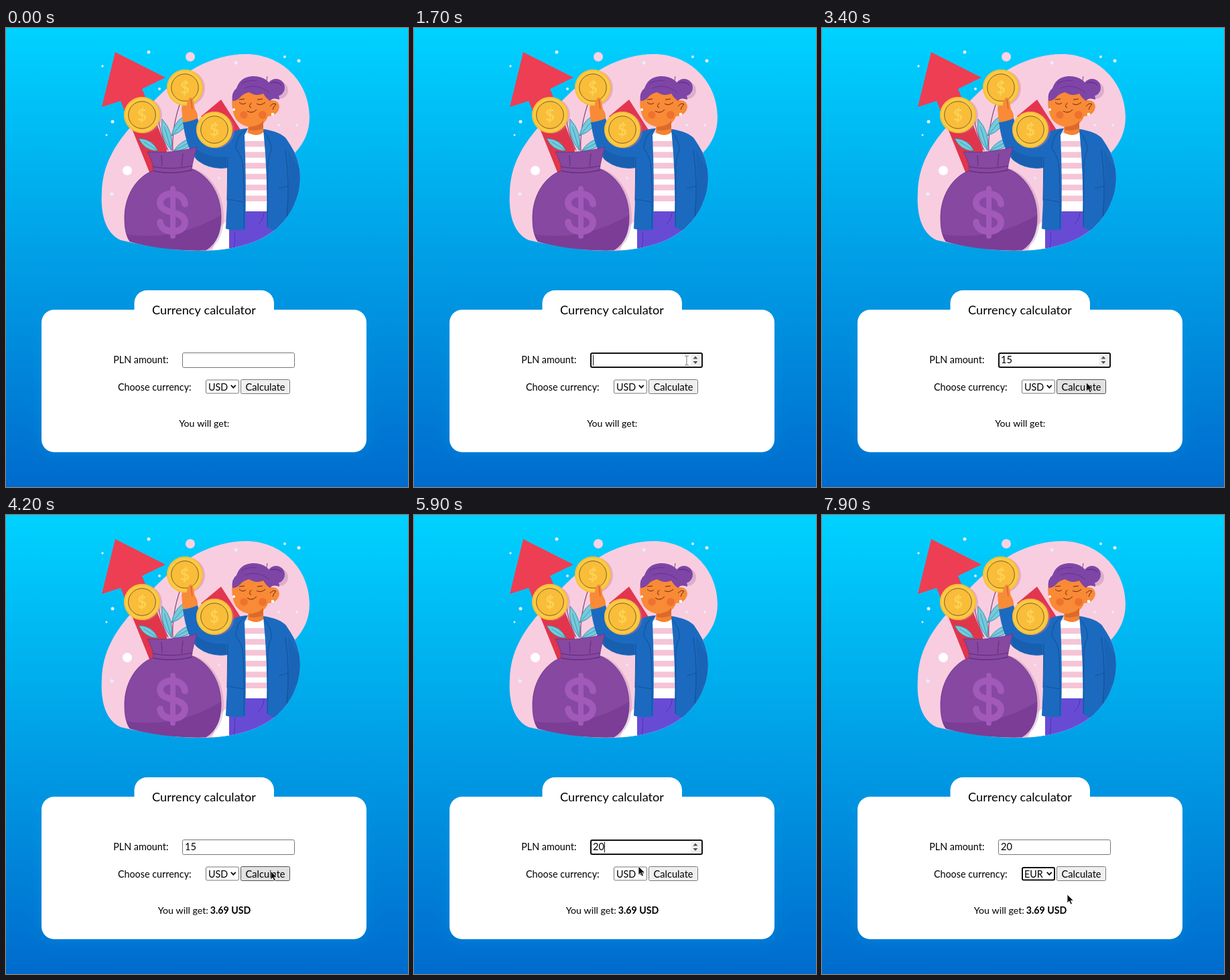
Animation, 600 px wide and 686 px high, one loop 8000 ms. Source, as an HTML page with a canvas:

```html
<!DOCTYPE html>
<html lang="en">
<head>
<meta charset="utf-8">
<title>Currency calculator</title>
<style>
html, body { margin: 0; width: 100%; height: 100%; overflow: hidden; }
canvas { display: block; width: 600px; height: 686px; }
</style>
</head>
<body>
<canvas id="stage"></canvas>
<script>
const W = 600, H = 686, LOOP = 8000, STEP = 100;
const canvas = document.getElementById('stage');
const dpr = window.devicePixelRatio || 1;
canvas.width = W * dpr;
canvas.height = H * dpr;
const c = canvas.getContext('2d');

function shape(d, fill, stroke, width = 1) {
  const p = new Path2D(d);
  if (fill) { c.fillStyle = fill; c.fill(p); }
  if (stroke) { c.strokeStyle = stroke; c.lineWidth = width; c.stroke(p); }
}

function dot(x, y, r, fill, stroke, width = 1) {
  c.beginPath();
  c.arc(x, y, r, 0, Math.PI * 2);
  if (fill) { c.fillStyle = fill; c.fill(); }
  if (stroke) { c.strokeStyle = stroke; c.lineWidth = width; c.stroke(); }
}

function box(x, y, w, h, r, fill, stroke, width = 1) {
  c.beginPath();
  c.roundRect(x, y, w, h, r);
  if (fill) { c.fillStyle = fill; c.fill(); }
  if (stroke) { c.strokeStyle = stroke; c.lineWidth = width; c.stroke(); }
}

function label(s, x, y, size = 14.35, weight = 400, align = 'left', color = '#000') {
  c.font = `${weight} ${size}px Lato, sans-serif`;
  c.textAlign = align;
  c.fillStyle = color;
  c.fillText(s, x, y);
}

// ---- illustration ----
const BLOB = 'M143 245C144 205 162 174 192 141C222 105 250 78 285 58C308 46 334 39 358 39' +
  'C411 39 453 80 453 133C453 155 445 172 431 187C441 207 441 237 433 256' +
  'C425 280 409 299 386 312C355 329 315 334 280 333C245 332 205 325 171 317C147 306 141 275 143 245Z';
const BAG = 'M220 213C195 222 176 251 177 286C177 303 181 314 185 319C220 329 262 333 298 332' +
  'C315 322 321 304 321 283C321 249 304 222 279 211Z';
const NECK = 'M211 185Q247 188 285 178C281 190 278 202 277 213Q248 219 220 214C220 204 216 194 211 185Z';
const DOTS = [[213, 36, 2.5], [343, 52, 2.5], [416, 43, 2], [437, 49, 2.5], [159, 140, 2.5], [150, 160, 1.5],
  [144, 57, 1.7], [158, 248, 2.5], [229, 91, 2], [318, 224, 1.8], [407, 145, 1.8], [434, 145, 1.8]];
const SKIN = '#f98a36', HAIR = '#7f45a6', JACKET = '#1b6abf', SEAM = '#154b90';

function coin(x, y) {
  dot(x + 3, y + 1, 27, 'rgba(196,120,160,.4)');
  dot(x, y, 27, '#fdca42');
  dot(x, y, 26, null, '#f6bc3a', 1.5);
  dot(x, y, 20.3, '#f9bd39', '#7b5c32', 1);
  label('$', x, y + 8.5, 24, 700, 'center', '#fdd255');
}

function leaf(x, y, tx, ty, bend) {
  const mx = (x + tx) / 2, my = (y + ty) / 2;
  const nx = (ty - y) * bend, ny = (x - tx) * bend;
  shape(`M${x} ${y}Q${mx + nx} ${my + ny} ${tx} ${ty}Q${mx - nx} ${my - ny} ${x} ${y}Z`, '#74cbdc', '#2f819e', 0.8);
  shape(`M${x} ${y}L${(mx + tx) / 2} ${(my + ty) / 2}`, null, '#2f819e', 0.7);
}

function woman() {
  // raised arm
  shape('M264 141L262 120Q263 111 269 110L273 105Q276 102 279 106L281 120Q287 126 286 138Z', SKIN);
  shape('M264 141Q275 140 286 135L292 157L333 164L331 209Q306 213 287 199Q270 185 264 141Z', JACKET);
  shape('M283 180Q302 195 329 192L329 208Q302 211 284 196Z', '#185fb0');

  c.save();
  c.clip(new Path2D(BLOB));
  shape('M308 332L318 300Q328 287 334 288L334 334Z', '#fff');
  shape('M333 272H404L409 315Q370 334 333 330Z', '#684bd5');
  shape('M341 304Q343 318 340 330M385 276Q384 287 376 294', null, '#4630a8', 0.8);
  shape('M355 156Q372 162 388 154L391 274H355Z', '#fff');
  for (let i = 0; i < 6; i++) {
    c.fillStyle = '#f5c4d7';
    c.fillRect(356, 169 + i * 16.3, 34, 8.5);
  }
  shape('M384 151Q409 155 418 165Q433 187 442 210L440 255L420 283L404 302Q397 303 389 297Q391 220 384 151Z', JACKET);
  shape('M421 181Q431 202 439 210L439 260L418 284Q424 235 421 181Z', '#1964b7');
  shape('M417 183Q424 234 419 282M384 154Q397 169 396 183Q389 199 391 216L390 297', null, SEAM, 0.9);
  c.restore();

  shape('M361 150Q338 151 330 164Q332 235 328 300Q342 304 357 301Q359 230 356 160Z', JACKET);
  shape('M359 151Q343 160 343 181Q353 191 354 211Q356 259 355 300M331 193L330 258', null, SEAM, 0.9);
  shape('M332 256L355 260M407 240L422 236', null, SEAM, 0.8);

  // head
  dot(408, 93, 13, 'rgba(150,95,155,.28)');
  dot(403, 89, 13, HAIR);
  shape('M390 72L389 79M395 82Q404 79 411 85', null, '#4b236d', 0.8);
  shape('M362 137L384 137L384 156Q374 164 361 156Z', '#f58231');
  shape('M338 101Q335 122 343 136Q352 148 369 148Q386 146 391 132Q406 131 408 118Q407 107 396 108L389 88L344 92Z', SKIN);
  shape('M362 148Q377 147 384 139L384 150Q373 155 362 152Z', '#dc6a2b');
  dot(355, 130, 5.7, '#ee722f');
  dot(383, 130, 6, '#ee722f');
  shape('M338 109Q336 96 344 90Q350 72 370 72Q393 73 399 94Q409 99 408 107Q398 103 394 109Q388 105 384 98' +
    'Q373 103 363 96Q354 98 350 103Q345 109 338 109Z', HAIR);
  shape('M351 83Q362 77 374 79M356 90Q374 82 393 96', null, '#5b2c80', 0.7);
  shape('M348 111Q353 116 358 112M374 113Q380 117 387 111M366 112Q361 118 366 119M360 124Q367 129 374 122' +
    'M348 107L356 106M375 107L383 106M394 117Q399 111 403 114Q399 118 398 122', null, '#64291d', 1);
  dot(340, 122, 2, '#fff');
  dot(398, 129, 2.3, '#fff');
}

function illustration() {
  shape(BLOB, '#f9cde0');
  dot(275, 43, 7, '#f8d3e6');
  for (const [x, y, r] of DOTS) dot(x, y, r, '#e3f1fc');
  dot(181, 213, 7, '#fff');

  shape('M163 36L238 74L203 91L240 181L235 215H214L171 109L143 118Z', '#ee3e53');
  shape('M188 149Q208 154 226 146L240 181L235 215H214Z', '#e0354b');
  shape('M321 107L353 157L315 172L291 132Z', '#e3364e');

  shape('M249 184Q247 148 261 109M242 183Q228 155 226 124', null, '#7b3c73', 1.1);
  leaf(247, 183, 233, 136, 0.24);
  leaf(247, 161, 277, 126, 0.3);
  leaf(227, 184, 198, 165, 0.31);
  leaf(250, 184, 286, 164, 0.27);

  woman();
  [[267, 89], [203, 130], [311, 152]].forEach(p => coin(...p));
  shape('M270 115Q270 107 275 104Q279 103 280 111L282 122Z', SKIN);
  shape('M276 106L278 121', null, '#a84e28', 0.8);

  c.save();
  c.clip(new Path2D(BLOB));
  c.translate(4, 0);
  shape(BAG, 'rgba(151,92,157,.25)');
  c.restore();
  shape(BAG, '#8648a0', '#6a3488', 0.8);
  c.save();
  c.clip(new Path2D(BAG));
  shape('M176 308Q255 320 323 278V340H176Z', '#7b3d96');
  c.restore();
  shape(NECK, '#8648a0', '#6a3488', 0.8);
  shape('M219 207Q248 213 278 206M221 214Q248 220 278 212M232 190L233 206M264 188L262 207', null, '#592a75', 0.9);

  c.lineCap = 'round';
  shape('M267 263C265 242 230 244 230 261C230 280 267 271 267 291C266 309 231 308 230 290', null, '#a159ba', 10);
  shape('M249 240V311', null, '#a159ba', 8);
  c.lineCap = 'butt';
}

// ---- form and state ----
const lastOf = (list, t) => list.reduce((v, [at, next]) => t >= at ? next : v, list[0][1]);
const TYPED = [[0, ''], [2300, '1'], [2800, '15'], [5100, '2'], [5500, '20']];
const FOCUS = [[0, ''], [1500, 'amount'], [3900, ''], [4700, 'amount'], [7000, ''], [7600, 'currency']];
const MOVES = [[1000, 430, 560], [1400, 407, 497], [1700, 407, 497], [2400, 388, 494], [2800, 388, 494],
  [3500, 395, 532], [4300, 395, 532], [4700, 300, 497], [5400, 300, 497], [5800, 335, 525],
  [6500, 335, 525], [6800, 338, 533], [7200, 338, 533], [7800, 366, 567]];

// the caret restarts its blink at every key or focus change
const caretOn = t => {
  const since = Math.max(...[...TYPED, ...FOCUS].map(e => e[0]).filter(at => at <= t));
  return (t - since) % 1000 < 500;
};

function pointer(t) {
  if (t < MOVES[0][0]) return null;
  const i = MOVES.findIndex(m => m[0] > t);
  if (i < 0) return MOVES[MOVES.length - 1].slice(1);
  const [t0, x0, y0] = MOVES[i - 1], [t1, x1, y1] = MOVES[i];
  const u = (t - t0) / (t1 - t0), k = u * u * (3 - 2 * u);
  return [x0 + (x1 - x0) * k, y0 + (y1 - y0) * k];
}

const inside = (p, x, y, w, h) => p && p[0] >= x && p[0] < x + w && p[1] >= y && p[1] < y + h;

function card() {
  c.save();
  c.shadowColor = 'rgba(0,150,225,.5)';
  c.shadowBlur = 18 * dpr;
  box(53, 421, 485, 213, 19, '#fff');
  c.restore();
  box(191.5, 392, 208.5, 58, [19, 19, 0, 0], '#fff');
  label('Currency calculator', 295.5, 427.5, 18.2, 400, 'center');
  label('PLN amount:', 160.2, 501);
  label('Choose currency:', 166.9, 541.5);
}

function form(t, p) {
  const focus = lastOf(FOCUS, t), text = lastOf(TYPED, t);
  const active = focus === 'amount', over = inside(p, 263, 485, 168, 23);

  if (active) box(264, 486, 166, 21, 2, '#fff', '#101010', 2);
  else box(263.5, 485.5, 167, 22, 2, '#fff', '#767676');
  label(text, 267, 501, 14.6);
  if (active && caretOn(t)) {
    c.fillStyle = '#111';
    c.fillRect(267 + c.measureText(text).width, 488.5, 1, 16);
  }
  if (active || over) {
    c.fillStyle = '#efefef';
    c.fillRect(413.5, 488, 13.5, 16.5);
    shape('M416.5 494.5L420 490.5L423.5 494.5ZM416.5 498L420 502L423.5 498Z', '#505050');
  }

  const picked = focus === 'currency';
  if (picked) box(299, 527, 48, 18.5, 2, '#fff', '#101010', 2);
  else box(298.5, 526, 49, 20, 2, '#fff', '#767676');
  label(t >= 7600 ? 'EUR' : 'USD', 302, 541.5);
  shape('M335.8 533.8L339.3 537.6L342.8 533.8', null, '#111', 1.9);

  const hot = inside(p, 350, 525, 74, 22);
  box(350.5, 525.5, 73, 21, 2, hot ? '#e2e2e2' : '#efefef', hot ? '#4f4f4f' : '#767676');
  label('Calculate', 387, 541.5, 14.6, 400, 'center');

  if (t < 3900) {
    label('You will get:', 295.8, 595.5, 14.2, 400, 'center');
  } else {
    label('You will get:', 226.7, 595.5, 14.2);
    label('3.69 USD', 304.7, 595.5, 14.2, 700);
  }
  return over;
}

function cursor([x, y], beam) {
  c.save();
  c.translate(x, y);
  if (beam) {
    shape('M-3 -7H-1L0 -6L1 -7H3M0 -6V6M-3 7H-1L0 6L1 7H3', null, '#777', 1);
  } else {
    shape('M0 0V13L3 10.2L5.2 15L7.5 14L5.3 9.4H9.4Z', '#111', '#fff', 0.8);
  }
  c.restore();
}

function draw(t) {
  c.setTransform(dpr, 0, 0, dpr, 0, 0);
  const sky = c.createLinearGradient(0, 0, 0, H);
  sky.addColorStop(0, '#00d2ff');
  sky.addColorStop(1, '#006bcd');
  c.fillStyle = sky;
  c.fillRect(0, 0, W, H);
  illustration();
  card();
  const p = pointer(t);
  const beam = form(t, p);
  if (p) cursor(p, beam);
}

const start = performance.now();
function tick() {
  const t = (performance.now() - start) % LOOP;
  draw(Math.floor(t / STEP) * STEP);
  requestAnimationFrame(tick);
}
tick();
</script>
</body>
</html>
```
